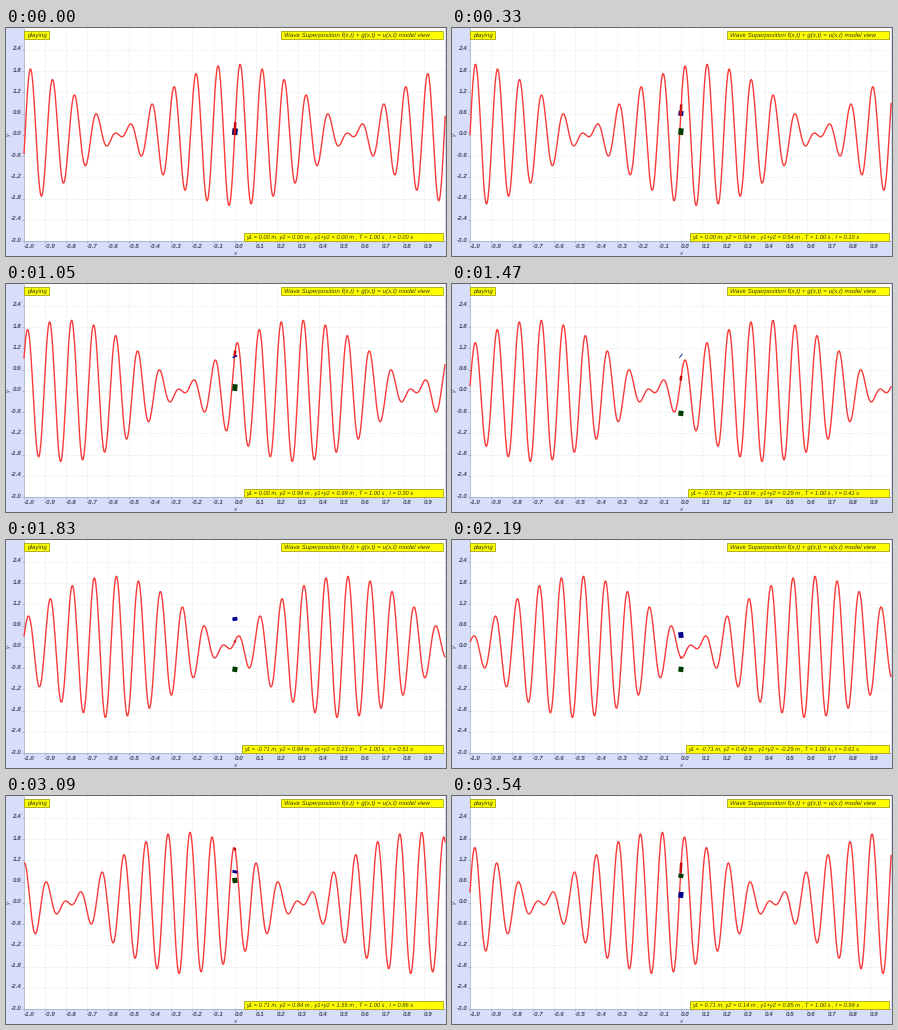
A matplotlib script for the animation above (3.6 s loop, 440 px wide and 228 px high).

```python
import numpy as np
import matplotlib.pyplot as plt
from matplotlib.animation import FuncAnimation
from matplotlib.patches import Rectangle

W, H, DPI = 440, 228, 64
PX = 72 / DPI                    # points per pixel
LEFT, RIGHT, BOTTOM = 18, 439.3, 213.3
X0, Y0 = 228.6, 106.9            # pixel position of the origin
SX, SY = 210.6, 35.4             # pixels per unit
STEPS, TICKS, TICK_MS = 80, 120, 30
LAMBDA1, LAMBDA2 = 0.10, 0.11
DX = 0.003                       # reach of the marker strokes along x
BOX_RIGHT = 437
AXIS_INK, LABEL_INK = "#4a4e66", "#3a3a08"

plt.rcParams["font.family"] = "Liberation Sans"
plt.rcParams["text.hinting"] = "none"

fig = plt.figure(figsize=(W / DPI, H / DPI), dpi=DPI, facecolor="#d6defa")
ax = fig.add_axes([0, 0, 1, 1])
ax.set_xlim(0, W)
ax.set_ylim(H, 0)
ax.axis("off")


def px(x):
    return X0 + SX * x


def py(y):
    return Y0 - SY * y


def wave(x, t, length):
    return np.sin(2 * np.pi * (x - t) / length)


def line(xs, ys, color, width, **kw):
    kw.setdefault("solid_capstyle", "butt")
    return ax.plot(xs, ys, color=color, lw=width * PX, **kw)[0]


def text(x, y, s, size=6.3, color=AXIS_INK, **kw):
    return ax.text(x, y, s, fontsize=size * PX, style="italic",
                   color=color, va="center", **kw)


def label_box(x, y, right, s, size, pad):
    box = Rectangle((x, y), right - x, 8, fc="#ffff00", ec="#a0a010",
                    lw=0.8 * PX, zorder=6)
    ax.add_patch(box)
    return box, text(x + pad, y + 4, s, size, LABEL_INK, zorder=7)


def draw_axes():
    ax.add_patch(Rectangle((LEFT, 0), RIGHT - LEFT, BOTTOM, fc="white", lw=0))
    dash = dict(dashes=(2, 2), zorder=1)
    for i in range(-10, 10):
        x = px(i / 10)
        line([x, x], [0, BOTTOM], "#e0e0e0", 0.6, **dash)
        line([x, x], [BOTTOM, BOTTOM + 2], "#9098b0", 0.6)
        text(x - 0.3, 218.6, f"{i / 10:.1f}", ha="left", weight="bold")
    for i in range(-5, 5):
        y = py(0.6 * i)
        line([LEFT, RIGHT], [y, y], "#e0e0e0", 0.6, **dash)
        line([LEFT - 2, LEFT], [y, y], "#9098b0", 0.6)
        text(15.2, y - 1.1, f"{0.6 * i:.1f}", ha="right", weight="bold")
    line([LEFT, LEFT, RIGHT], [0, BOTTOM, BOTTOM], "#a0a8c0", 0.7)
    text(228.5, 225, "x", ha="center")
    text(2.8, 107, "y", ha="center", rotation=90)


draw_axes()
label_box(18.1, 3.2, 42.8, "playing", 6.3, 2.6)
label_box(275.3, 3.2, BOX_RIGHT,
          "Wave Superposition f(x,t) + g(x,t) = u(x,t) model view", 6.3, 2.7)
status_box, status = label_box(237.5, 204.9, BOX_RIGHT, "", 5.7, 2.5)

xs = np.linspace(-1, 1, 1000)
curve = line(px(xs), 0 * xs, "#f83c3c", 1.4, zorder=3)
ends = np.array([0, DX])
green = line(px(ends), ends, "#003c00", 5, zorder=4)
blue = line(px(ends), ends, "#00008c", 5, zorder=4)
red = line(px(ends), ends, "#c81010", 2.6, zorder=5)


def step_at(tick):
    """Two steps share every three ticks, after a first single tick."""
    if tick == 0:
        return 0
    pair, rest = divmod(tick - 1, 3)
    return 1 + 2 * pair + min(rest, 1)


def number(v):
    return f"{round(float(v), 2) + 0.0:.2f}"


def update(tick):
    t = step_at(tick) / STEPS
    curve.set_ydata(py(wave(xs, t, LAMBDA1) + wave(xs, t, LAMBDA2)))
    y1 = wave(ends, t, LAMBDA1)
    y2 = wave(ends, t, LAMBDA2)
    for mark, y in ((green, y1), (blue, y2), (red, y1 + y2)):
        mark.set_ydata(py(y))

    s = (f"y1 = {number(y1[0])} m, y2 = {number(y2[0])} m , "
         f"y1+y2 = {number(y1[0] + y2[0])} m , T = 1.00 s , t = {t:.2f} s")
    left = 237.5 - 2 * s.count("-")
    status_box.set_x(left)
    status_box.set_width(BOX_RIGHT - left)
    status.set_x(left + 2.5)
    status.set_text(s)
    return curve, green, blue, red, status_box, status


anim = FuncAnimation(fig, update, frames=TICKS, interval=TICK_MS,
                     repeat=True, repeat_delay=0, blit=False)
plt.show()
```
